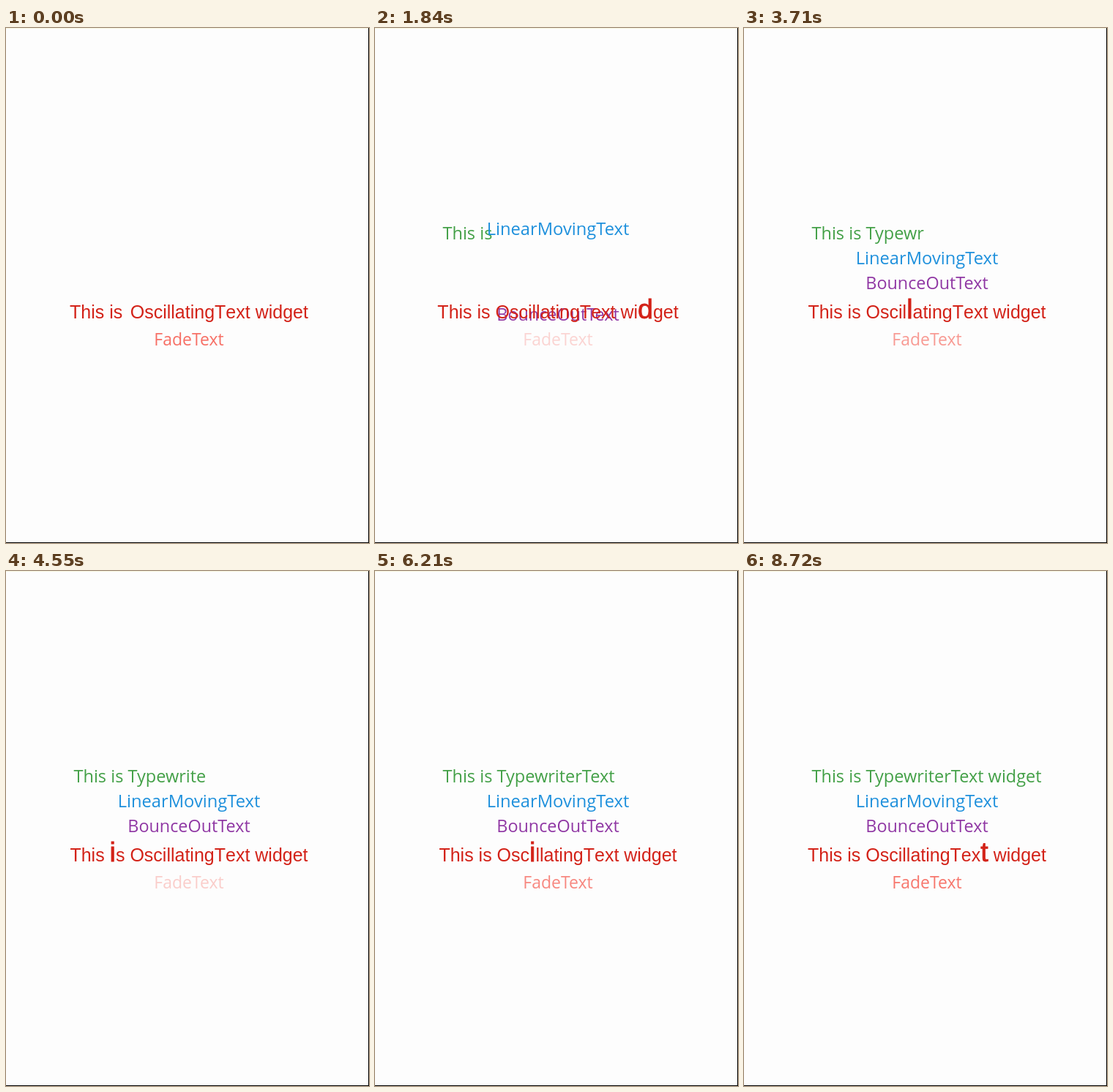
Recreate the animation shown at these times as an HTML page with a canvas. Size 496 by 704 pixels, loop 8800 ms.

```html
<!DOCTYPE html>
<html lang="en">
<head>
<meta charset="utf-8">
<title>Animated text widgets</title>
<style>
html, body { margin: 0; height: 100%; overflow: hidden; background: #fdfdfd; }
canvas { display: block; }
</style>
</head>
<body>
<canvas id="stage" width="496" height="704"></canvas>
<script>
const ctx = document.getElementById('stage').getContext('2d');
const LOOP = 8800, TICK = 100, MID = 250;
const SANS = '"Open Sans", "Noto Sans", sans-serif';
const ARIAL = '"Liberation Sans", Arial, sans-serif';
const TYPED = 'This is TypewriterText widget';
const WAVE = [...'This is OscillatingText widget'];

function bounceOut(u) {
  const k = 7.5625, d = 2.75;
  if (u >= 1) return 1;
  if (u < 1 / d) return k * u * u;
  if (u < 2 / d) return k * (u - 1.5 / d) ** 2 + .75;
  if (u < 2.5 / d) return k * (u - 2.25 / d) ** 2 + .9375;
  return k * (u - 2.625 / d) ** 2 + .984375;
}

function label(text, x, y, size, color, align = 'center') {
  ctx.font = `${size}px ${SANS}`;
  ctx.textAlign = align;
  ctx.fillStyle = color;
  ctx.fillText(text, x, y);
}

// index of the enlarged letter, running to and fro, two ticks at the left end
function bigIndex(tick) {
  const last = WAVE.length - 1;
  const pos = (tick + 7) % (2 * last + 1);
  return Math.min(pos, 2 * last - pos);
}

function oscillating(tick) {
  const big = bigIndex(tick);
  const setFont = i => ctx.font = `${i === big ? 37.5 : 25}px ${ARIAL}`;
  const widths = WAVE.map((c, i) => { setFont(i); return ctx.measureText(c).width; });
  let x = MID - widths.reduce((a, b) => a + b) / 2;
  ctx.textAlign = 'left';
  ctx.fillStyle = ctx.strokeStyle = '#d32218';
  ctx.lineWidth = .8;
  WAVE.forEach((c, i) => {
    setFont(i);
    ctx.fillText(c, x, 397);
    if (i === big) ctx.strokeText(c, x, 397);
    x += widths[i];
  });
}

function draw(now) {
  const tick = Math.floor((now % LOOP + 90) / TICK);

  ctx.fillStyle = '#fdfdfd';
  ctx.fillRect(0, 0, 496, 704);
  ctx.fillStyle = '#f9f8e2';
  ctx.fillRect(0, 0, 496, 1);
  ctx.fillStyle = '#000';
  ctx.fillRect(495, 0, 1, 704);
  ctx.fillRect(0, 703, 496, 1);

  if (tick > 0) {
    const rise = 23.8 * Math.max(0, 20.7 - tick);
    const drop = 808 * (1 - bounceOut((tick + 16.6) / 41.67));
    label(TYPED.slice(0, Math.floor((tick + 5) / 3)), 92.5, 289, 23.5, '#43a047', 'left');
    label('LinearMovingText', MID, 323 - rise, 23.7, '#1e90dc');
    label('BounceOutText', MID, 357 + drop, 23.4, '#9038a4');
  }
  oscillating(tick);
  ctx.globalAlpha = .6 + .4 * Math.cos(2 * Math.PI * (tick - 4.8) / 26);
  label('FadeText', MID, 434, 23, '#f44336');
  ctx.globalAlpha = 1;
}

const start = performance.now();
(function loop() {
  draw(performance.now() - start);
  requestAnimationFrame(loop);
})();
</script>
</body>
</html>
```
